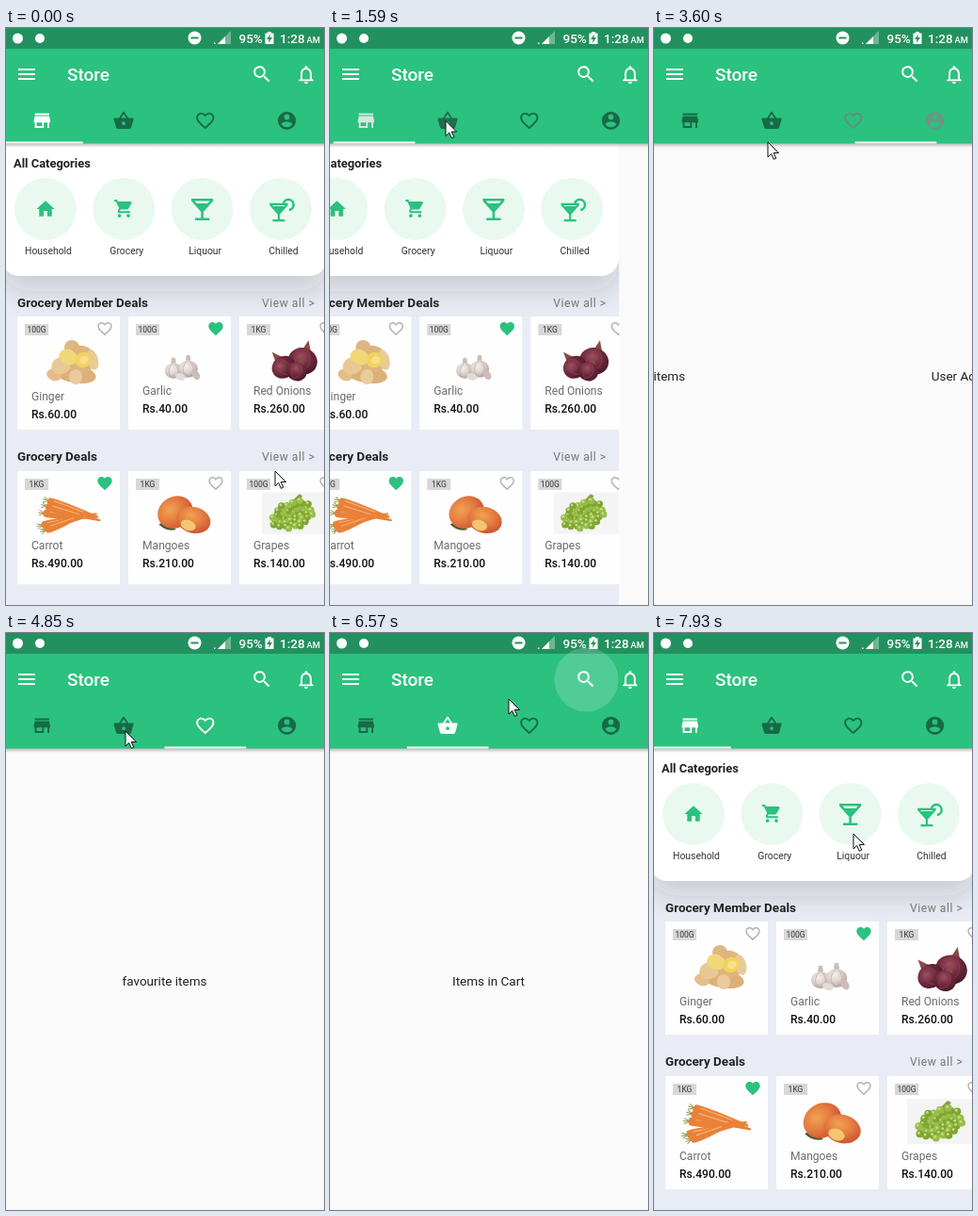
An HTML page for the animation above (8000 ms loop, 338 px wide and 612 px high).

```html
<!DOCTYPE html>
<html lang="en">
<head>
<meta charset="utf-8">
<title>Store app</title>
<style>
  html, body { margin: 0; width: 100%; height: 100%; overflow: hidden; background: #fafafa; }
  svg { display: block; width: 100%; height: 100%; }
  text { font-family: Roboto, sans-serif; }
</style>
</head>
<body>
<svg id="stage" viewBox="0 0 338 612"></svg>
<script>
const GREEN = '#2bc17f', LOOP = 8000, PAGE = 347, TAB = PAGE / 4;

// Icons on a 24 unit grid
const ICONS = {
  store: 'M20 4H4v2h16V4zm1 10v-2l-1-5H4l-1 5v2h1v6h10v-6h4v6h2v-6h1zm-9 4H6v-4h6v4z',
  basket: 'M17.2 9l-4.4-6.6c-.4-.6-1.3-.6-1.7 0L6.8 9H2c-.6 0-1 .5-1 1.3l2.6 9.2c.2.9 1 1.5 1.9 1.5h13c.9 0 1.7-.6 1.9-1.5L23 10.3C23 9.5 22.6 9 22 9zM9 9l3-4.4L15 9zm3 8a2 2 0 1 1 0-4 2 2 0 0 1 0 4z',
  heart: 'M12 21.35l-1.45-1.32C5.4 15.36 2 12.28 2 8.5 2 5.42 4.42 3 7.5 3c1.74 0 3.41.81 4.5 2.09C13.09 3.81 14.76 3 16.5 3 19.58 3 22 5.42 22 8.5c0 3.78-3.4 6.86-8.55 11.54z',
  account: 'M12 2a10 10 0 1 0 0 20 10 10 0 0 0 0-20zm0 3a3 3 0 1 1 0 6 3 3 0 0 1 0-6zm0 14.2c-2.5 0-4.7-1.3-6-3.2 0-2 4-3.1 6-3.1s6 1.1 6 3.1c-1.3 1.9-3.5 3.2-6 3.2z',
  search: 'M15.5 14h-.8l-.3-.3A6.5 6.5 0 1 0 13.7 14.4l.3.3v.8l5 5 1.5-1.5zm-6 0a4.5 4.5 0 1 1 0-9 4.5 4.5 0 0 1 0 9z',
  bell: 'M12 22c1.1 0 2-.9 2-2h-4c0 1.1.9 2 2 2zm6-6v-5c0-3.07-1.63-5.64-4.5-6.32V4a1.5 1.5 0 0 0-3 0v.68C7.64 5.36 6 7.92 6 11v5l-2 2v1h16v-1zm-2 1H8v-6c0-2.48 1.51-4.5 4-4.5s4 2.02 4 4.5z',
  home: 'M10 20v-6h4v6h5v-8h3L12 3 2 12h3v8z',
  cart: 'M7 18a2 2 0 1 0 0 4 2 2 0 0 0 0-4zM1 2v2h2l3.6 7.6-1.35 2.44C4.5 15.4 5.5 17 7 17h12v-2H7.4l-.2-.4.9-1.6h7.45c.75 0 1.4-.4 1.75-1L20.9 5.5 20 4H5.2l-.9-2zm16 16a2 2 0 1 0 0 4 2 2 0 0 0 0-4z',
  bar: 'M21 5V3H3v2l8 9v5H6v2h12v-2h-5v-5zM7.43 7L5.66 5h12.69l-1.78 2z'
};
ICONS.heartLine = ICONS.heart + 'M12 18.65C7.14 14.24 4 11.39 4 8.5 4 6.5 5.5 5 7.5 5c1.54 0 3.04 1 3.57 2.36h1.87C13.46 6 14.96 5 16.5 5c2 0 3.5 1.5 3.5 3.5 0 2.89-3.14 5.74-8 10.15z';

const icon = (name, x, y, scale, fill, id = '') =>
  `<path ${id && `id="${id}"`} d="${ICONS[name]}" fill="${fill}" fill-rule="evenodd" transform="translate(${x} ${y}) scale(${scale}) translate(-12 -12)"/>`;
const text = (s, x, y, size, fill, attrs = '') =>
  `<text x="${x}" y="${y}" font-size="${size}" fill="${fill}" ${attrs}>${s}</text>`;
const rect = (x, y, w, h, fill, attrs = '') =>
  `<rect x="${x}" y="${y}" width="${w}" height="${h}" fill="${fill}" ${attrs}/>`;
const blob = (x, y, rx, ry, fill, turn = 0) =>
  `<ellipse cx="${x}" cy="${y}" rx="${rx}" ry="${ry}" fill="${fill}" transform="rotate(${turn} ${x} ${y})"/>`;
const path = (d, fill, attrs = '') => `<path d="${d}" fill="${fill}" ${attrs}/>`;
const glow = (id, light, mid, dark) => `<radialGradient id="${id}" cx=".4" cy=".35" r=".7">
  <stop stop-color="${light}"/><stop offset=".5" stop-color="${mid}"/><stop offset="1" stop-color="${dark}"/></radialGradient>`;
const CENTER = 'text-anchor="middle"', BOLD = 'font-weight="700"', MEDIUM = 'font-weight="500"';

// Simplified produce pictures, relative to their card
const garlicBulb = (x, y, r) => `<g transform="translate(${x} ${y})">` +
  path(`M-2 ${-r - 5}L2 ${-r - 5}L3 ${-r + 1}H-3Z`, '#cdbdb6') + blob(0, 0, r, r * .9, 'url(#garlic)') +
  path(`M0 ${-r}Q${-r} 0 -2 ${r - 2}M0 ${-r}Q${r} 0 2 ${r - 2}`, 'none', 'stroke="#b9a6a2" stroke-width=".7"') + '</g>';
const onion = (x, y, r, turn) => `<g transform="translate(${x} ${y}) rotate(${turn})">` +
  path(`M-4 ${-r + 3}L-1 ${-r - 8}L5 ${-r + 3}`, '#8a4a45') + blob(0, 0, r, r * .9, 'url(#onion)') +
  path(`M0 ${-r + 2}Q${-r} 0 0 ${r - 3}M0 ${-r + 2}Q${r} 0 0 ${r - 3}`, 'none', 'stroke="#8f4358" stroke-width=".7"') + '</g>';
const carrot = (x, y, length, turn) => `<g transform="translate(${x} ${y}) rotate(${turn})">` +
  path('M0 0L-6-3M0 0L-7 0M0 0L-6 3', 'none', 'stroke="#8a9a4c"') +
  path(`M0-4Q8-6 ${length} -1V1Q8 7 0 4Q-3 0 0-4Z`, '#ea8138') +
  path(`M6-2L${length * .7}-.5`, 'none', 'stroke="#f6b176" stroke-width="1.2"') + '</g>';

// Round berries packed into a bunch that narrows downwards
function grapes() {
  let out = rect(21, 24, 90, 48, '#f3f4f3') + path('M54 36L64 26L68 28L59 38', '#8a9a4a');
  for (let i = 0; i < 46; i++) {
    const angle = i * 2.4, reach = Math.sqrt(i / 46);
    const x = 56 + Math.cos(angle) * 25 * reach, y = 50 + Math.sin(angle) * 16 * reach - (x - 56) * .2;
    out += blob(x, y, 4, 4, i % 2 ? '#7fa631' : '#98bd48') + blob(x - 1, y - 1.2, 1.5, 1.5, '#c3da86');
  }
  return out;
}

const PHOTOS = {
  Ginger: blob(60, 60, 24, 10, '#dcb079', 12) + blob(39, 62, 8, 6, '#e5bd86', 20) + blob(47, 52, 11, 9, '#e8c893', -20) +
    blob(58, 33, 8, 8, '#dcb784') + blob(68, 45, 15, 14, '#dfb57c', 20) + blob(80, 46, 6, 11, '#e8cb97', -15) +
    blob(62, 64, 7, 8, '#e9cb9d') + blob(54, 43, 10, 8, '#f0d778', 25) + blob(70, 46, 9, 8, '#f2d35f', -25) + blob(71, 46, 5, 4, '#f6e08a', -25),
  Garlic: garlicBulb(47, 62, 10) + garlicBulb(64, 60, 11) + blob(55, 69, 6, 4, '#e4dad6', 15) + blob(73, 67, 4, 6, '#cdbdb8', -30),
  'Red Onions': onion(68, 51, 17, 18) + onion(46, 58, 14, -35) + onion(61, 63, 12, 25),
  Carrot: carrot(31, 34, 60, 18) + carrot(26, 48, 62, 4) + carrot(24, 62, 64, -12) + carrot(29, 40, 64, 15) + carrot(28, 67, 50, -22),
  Mangoes: path('M30 61Q38 56 50 67Q39 70 30 61', '#4c5a3a') + blob(49, 47, 21, 18, 'url(#mango)', -30) +
    blob(70, 56, 20, 15, 'url(#mango)', 15) + blob(64, 62, 9, 6, '#f4c672', 20),
  Grapes: grapes()
};

function card(x, y, name, price, weight, liked) {
  const late = name !== 'Ginger';
  return `<g transform="translate(${x} ${y})">` + rect(0, 0, 109, 120, '#fefefe') +
    `<g ${late ? 'class="photo"' : ''}>${PHOTOS[name]}</g>` +
    rect(8, 8, 25, 12, '#d7d7d7') + text(weight, 20.5, 17, 8.5, '#333', CENTER) +
    icon(liked ? 'heart' : 'heartLine', 93, 13, .77, liked ? GREEN : '#b4b4b4') +
    `<g ${late ? 'class="caption"' : ''}>` + text(name, 15, 89, 12.1, '#6b6b6b') +
    text('Rs.' + price + '.00', 15, 108, 12.1, '#111', MEDIUM) + '</g></g>';
}

function category(i, label, art) {
  const x = 42 + i * 83.3;
  return `<circle cx="${x}" cy="192" r="33" fill="#e9f9f0"/>` + art(x) + text(label, x + 3, 240, 10.4, '#333', CENTER);
}

const dealsHeader = (title, y) => text(title, 12, y, 13.5, '#222', BOLD) +
  text('View all &gt;', 272, y, 12.2, '#777', 'letter-spacing=".5"');

const storePage = '<g clip-path="url(#page)">' + rect(-5, 100, PAGE, 520, '#e9ecf4') +
  rect(-5, 100, PAGE, 163, '#fff', 'rx="20" filter="url(#soft)"') +
  text('All Categories', 8, 148, 12.9, '#222', BOLD) +
  category(0, 'Household', x => icon('home', x, 192, .96, GREEN)) +
  category(1, 'Grocery', x => icon('cart', x, 191.5, .94, GREEN)) +
  category(2, 'Liquour', x => icon('bar', x, 192.5, 1.28, GREEN)) +
  category(3, 'Chilled', x => icon('bar', x - 2, 195.5, 1.08, GREEN) + path(`M${x - 8} 189H${x + 5}L${x - 2} 197Z`, GREEN) +
    path(`M${x + 3} 186A5.5 5.5 0 1 1 ${x + 9} 193`, 'none', `stroke="${GREEN}" stroke-width="2.5"`)) +
  dealsHeader('Grocery Member Deals', 296) +
  card(12, 306, 'Ginger', 60, '100G') + card(130, 306, 'Garlic', 40, '100G', true) + card(248, 306, 'Red Onions', 260, '1KG') +
  dealsHeader('Grocery Deals', 459) +
  card(12, 470, 'Carrot', 490, '1KG', true) + card(130, 470, 'Mangoes', 210, '1KG') + card(248, 470, 'Grapes', 140, '100G') + '</g>';

const textPage = (i, label) => text(label, 168.5 + i * PAGE, 374, 13.5, '#222', CENTER);

const statusBar = rect(0, 0, 338, 22, '#23915f') +
  blob(12.5, 11, 5.5, 5.5, '#fff') + blob(36, 11, 5, 5, '#fff') +
  blob(200.5, 10.5, 7, 7, '#fff') + rect(196.5, 9.5, 8, 2, '#23915f') +
  path('M225 17L239 3V17Z', '#fff', 'opacity=".35"') + path('M225 17L233 9V17Z', '#fff') + rect(221, 15.5, 1.5, 1.5, '#fff') +
  text('95%', 247.5, 16, 13.5, '#fff', MEDIUM) +
  path('M275.5 5.5H278V4h4v1.5h2.5V17h-9Z', '#fff') + path('M281 6.5L277 12h2.5L279 16l4-6h-2.5Z', '#23915f') +
  text('1:28', 291, 16, 13.5, '#fff', MEDIUM) + text('AM', 319.5, 16, 9.3, '#fff', MEDIUM);

const TAB_ICONS = ['store', 'basket', 'heartLine', 'account'];
const appBar = rect(0, 122, 338, 5, 'url(#shade)') + rect(0, 22, 338, 100.5, GREEN) + statusBar +
  [43, 48, 53].map(y => rect(13, y, 18, 2, '#fff')).join('') +
  text('Store', 65, 56, 19, '#fff', MEDIUM) +
  '<circle id="ripple" cx="272.5" cy="49.5" fill="#fff"/>' +
  icon('search', 272, 49, .98, '#fff') + icon('bell', 319, 49.5, .98, '#fff') +
  TAB_ICONS.map((name, i) => icon(name, 38.3 + i * TAB, 98.3, .96, '#fff', 'tab' + i)).join('') +
  rect(-5, 120.5, TAB, 2, '#fff', 'id="indicator"');

const stage = document.getElementById('stage');
stage.innerHTML = `<defs>
  <linearGradient id="shade" x2="0" y2="1"><stop stop-opacity=".28"/><stop offset="1" stop-opacity="0"/></linearGradient>
  ${glow('mango', '#f0a452', '#e57c40', '#c9512f')}${glow('onion', '#a05064', '#6e2a3a', '#43172a')}${glow('garlic', '#f4efec', '#ded3cf', '#a99a97')}
  <clipPath id="page">${rect(-5, 100, PAGE, 512, '#000')}</clipPath>
  <filter id="soft" x="-20%" y="-10%" width="140%" height="160%"><feDropShadow dx="0" dy="16" stdDeviation="14" flood-color="#333" flood-opacity=".16"/></filter>
</defs>` + rect(0, 0, 338, 612, '#fafafa') +
  `<g id="pages">${storePage}${textPage(1, 'Items in Cart')}${textPage(2, 'favourite items')}${textPage(3, 'User Account')}</g>` +
  appBar + path('M0 0V16L3.7 12.5L6.3 18.3L8.8 17.2L6.2 11.5H11.5Z', '#fff', 'id="cursor" stroke="#111" stroke-linejoin="round"');

const el = id => document.getElementById(id);
const clamp = v => Math.min(1, Math.max(0, v));
const smooth = v => v * v * (3 - 2 * v);

// cubic-bezier(.25, .1, .25, 1)
function ease(x) {
  const bezier = (s, a, b) => 3 * a * s * (1 - s) ** 2 + 3 * b * s * s * (1 - s) + s ** 3;
  let low = 0, high = 1;
  for (let i = 0; i < 18; i++) {
    const mid = (low + high) / 2;
    if (bezier(mid, .25, .25) < x) low = mid; else high = mid;
  }
  return bezier(low, .1, 1);
}

// [start time, tab change]
const SLIDES = [[1560, 1], [2350, 1], [3510, 1], [4480, -1], [5005, -1], [7450, -1]];
const tabPosition = t => SLIDES.reduce((p, [start, step]) => p + step * ease(clamp((t - start) / 300)), 0);

// [time, x, y]
const CURSOR = [[0, 286, 470], [860, 203, 194], [1350, 126, 230], [1600, 123, 98], [1900, 212, 100], [2240, 288, 284],
  [2600, 288, 284], [2900, 287, 96], [3420, 102, 112], [3600, 121, 121], [4050, 210, 98], [4500, 190, 108], [4850, 127, 104],
  [5240, 127, 104], [5640, 104, 96], [5790, 100, 97], [6200, 274, 50], [6570, 190, 70], [7000, 34, 98], [7380, 42, 104], [7930, 212, 213], [8000, 214, 215]];

function cursorAt(t) {
  const i = Math.max(1, CURSOR.findIndex(key => key[0] > t));
  const [t0, x0, y0] = CURSOR[i - 1], [t1, x1, y1] = CURSOR[i];
  const k = smooth((t - t0) / (t1 - t0));
  return [x0 + (x1 - x0) * k, y0 + (y1 - y0) * k];
}

function render(t) {
  const position = tabPosition(t);
  el('pages').setAttribute('transform', `translate(${-position * PAGE} 0)`);
  el('indicator').setAttribute('x', -5 + position * TAB);
  TAB_ICONS.forEach((_, i) => {
    const k = clamp(1 - Math.abs(position - i)), c = Math.round(255 * k);
    el('tab' + i).setAttribute('fill', `rgba(${c},${c},${c},${.45 + .55 * k})`);
  });

  // Product pictures reload at full size after the first visit
  const reloaded = t > 4000;
  for (const node of document.querySelectorAll('.photo'))
    node.setAttribute('transform', reloaded ? '' : 'translate(4.8 .4) scale(.92)');
  for (const node of document.querySelectorAll('.caption'))
    node.setAttribute('transform', reloaded ? '' : 'translate(0 -6.5)');

  el('ripple').setAttribute('r', 34 * smooth(clamp((t - 6380) / 190)));
  el('ripple').setAttribute('opacity', .18 * (1 - clamp((t - 6600) / 300)));
  el('cursor').setAttribute('transform', `translate(${cursorAt(t)})`);
}

const started = performance.now();
function frame() {
  render((performance.now() - started) % LOOP);
  requestAnimationFrame(frame);
}
frame();
</script>
</body>
</html>
```
